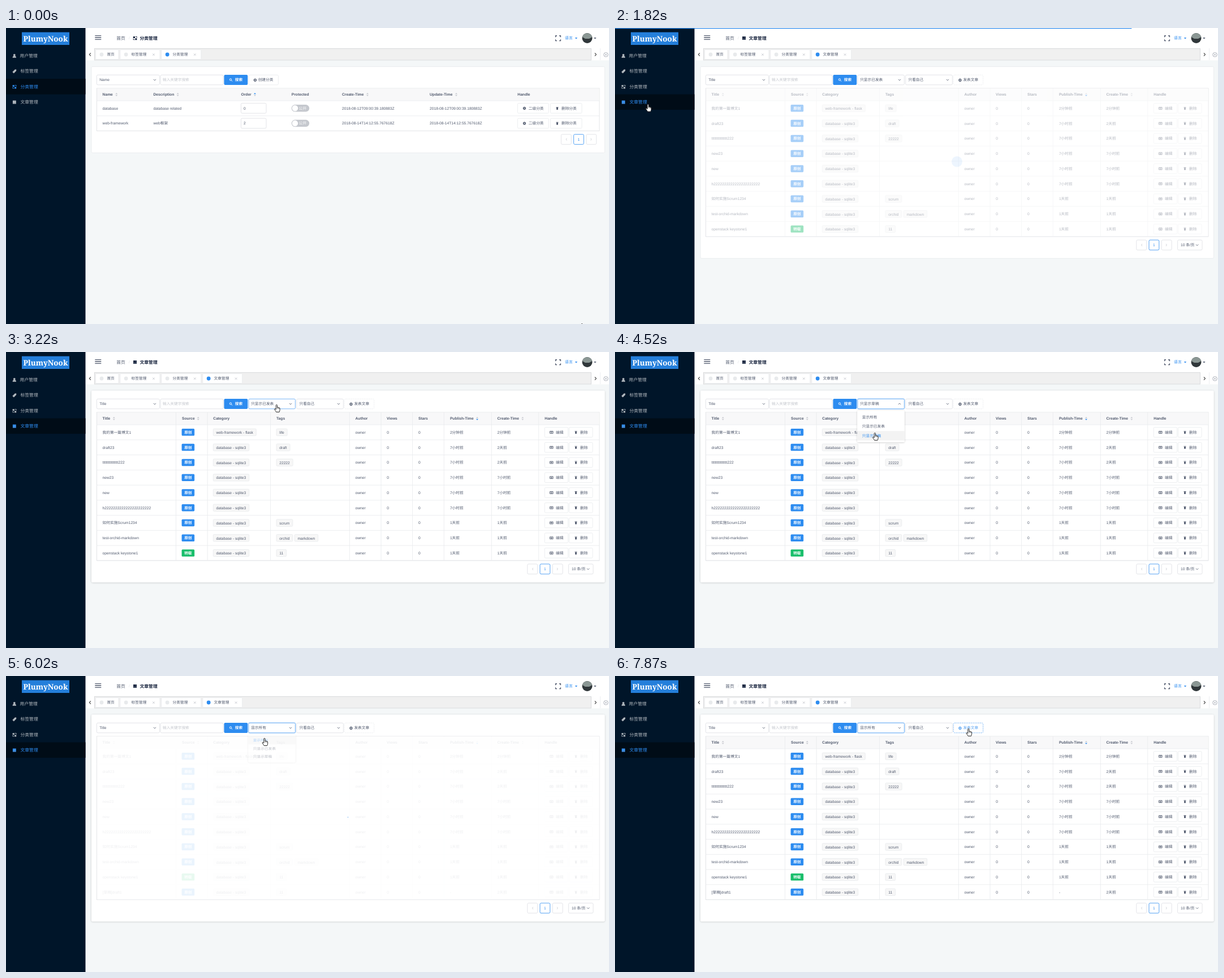
Recreate the animation shown at these times as an HTML page. Size 1066 by 525 pixels, loop 8000 ms.

```html
<!DOCTYPE html>
<html lang="zh-CN">
<head>
<meta charset="utf-8">
<title>文章管理</title>
<style>
  html, body { margin: 0; width: 100%; height: 100%; overflow: hidden; background: #f4f7f8; }
  svg { display: block; width: 1066px; height: 525px; }
  text {
    font-family: "Liberation Sans", "Noto Sans CJK SC", "Noto Sans CJK", sans-serif;
    text-rendering: geometricPrecision;
    white-space: pre;
  }
  #brand { font: bold 13.5px "Noto Serif", serif; }
</style>
</head>
<body>
<svg id="stage" viewBox="0 0 1066 525" xmlns="http://www.w3.org/2000/svg"></svg>
<script>
const LOOP = 8000, SIZE = 6.69, ROW = 26.77, HEAD = 129;
const BLUE = '#2d8cf0', INK = '#515a6e', LINE = '#dcdee2', PALE = '#e8eaec', MUTED = '#c5c8ce';

// ---- drawing helpers (cy is the vertical middle) ----
const text = (x, cy, s, fill = INK, size = SIZE, more = '') =>
  `<text x="${x}" y="${cy + size * 0.36}" font-size="${size}" fill="${fill}" ${more}>${s}</text>`;
const bold = (x, cy, s, fill = INK, size = SIZE) => text(x, cy, s, fill, size, 'font-weight="bold"');
const box = (x, y, x2, y2, fill = '#fff', stroke = 'none', rx = 0, more = '') =>
  `<rect x="${x}" y="${y}" width="${x2 - x}" height="${y2 - y}" rx="${rx}" fill="${fill}" stroke="${stroke}" stroke-width=".8" ${more}/>`;
const line = (d, stroke = INK, w = 0.8, more = '') =>
  `<path d="${d}" fill="none" stroke="${stroke}" stroke-width="${w}" ${more}/>`;
const shape = (d, fill = 'currentColor') => `<path d="${d}" fill="${fill}"/>`;
const dot = (x, y, r, fill) => `<circle cx="${x}" cy="${y}" r="${r}" fill="${fill}"/>`;
const group = (id, body, more = '') => `<g id="${id}" ${more}>${body}</g>`;
const at = (x, y, body) => `<g transform="translate(${x} ${y})">${body}</g>`;
const chevron = (x, y, dir = 1) => `M${x - 2.2} ${y - 1.1 * dir}L${x} ${y + 1.1 * dir}L${x + 2.2} ${y - 1.1 * dir}`;

const pen = document.createElement('canvas').getContext('2d');
pen.font = '100px "Liberation Sans", sans-serif';
const widthOf = s => pen.measureText(s).width * SIZE / 100;

const icons = {
  user: dot(0, -1.4, 1.9, 'currentColor') + shape('M-3.2 3.4Q-3.2 -.2 0 -.2T3.2 3.4Z'),
  tag: shape('M-3.5 1.2L1 -3.2L3.4 -3.2L3.4 -.8L-1 3.6Z'),
  sort: shape('M-3.2 -3H0V0H-3.2ZM.4 .3H3.4V3.2H.4Z') + line('M.8 -2.6H3.3V-.6M-2.9 .8V2.7H-.3', 'currentColor', 0.9),
  book: shape('M-2.9 -3H3V3H-2.9Z') + line('M-2 1.7H2.3M.8 -2.4V-.6', '#8b99a8', 0.7),
  plus: dot(0, 0, 2.6, 'currentColor') + line('M-1.5 0H1.5M0 -1.5V1.5', '#fff', 0.8),
  cross: dot(0, 0, 2.6, 'currentColor') + line('M-1 -1L1 1M1 -1L-1 1', '#fff', 0.8),
  trash: shape('M-2 -2.4H2V-1.6H-2ZM-1.6 -1.2H1.6L1.3 2.6H-1.3Z'),
  card: line('M-2.8 -1.9H2.8V1.9H-2.8ZM-1.6 -.5H1.6M-1 .8H1', 'currentColor', 0.9),
  search: `<circle cx="-.5" cy="-.5" r="1.7" fill="none" stroke="currentColor" stroke-width=".9"/>` + line('M.8 .8L2.6 2.6', 'currentColor', 1)
};
const icon = (name, x, y, color) => `<g transform="translate(${x} ${y})"${color ? ` style="color:${color}"` : ''}>${icons[name]}</g>`;

const button = (x, x2, cy, name, label, lx) =>
  box(x, cy - 8.8, x2, cy + 8.8, '#fff', PALE, 1.6) + icon(name, x + 12, cy, INK) + text(lx, cy, label);
const select = (x, x2, label) =>
  box(x, 83.3, x2, 100.8, '#fff', LINE, 2) + text(x + 4.8, 92, label) + line(chevron(x2 - 8.5, 92));
const sorter = (x, active = 0) =>
  shape(`M${x - 2} 117.3L${x} 115L${x + 2} 117.3Z`, active > 0 ? BLUE : MUTED) +
  shape(`M${x - 2} 118.8L${x} 121.1L${x + 2} 118.8Z`, active < 0 ? BLUE : MUTED);
const headings = list => list.map(([x, s]) => bold(x, 118, s)).join('');
const pager = (x, cy) => [0, 22.2, 44.5].map((dx, i) => {
  const mid = x + dx + 8.9;
  return box(x + dx, cy - 8.9, x + dx + 17.8, cy + 8.9, '#fff', i === 1 ? BLUE : LINE, 2) +
    (i === 1 ? text(mid - 1.9, cy, '1', BLUE)
      : line(`M${mid + 1 - i} ${cy - 2}l${i - 1} 2l${1 - i} 2`, MUTED));
}).join('');
const search = field => select(160.4, 271.4, field) +
  box(273.2, 83.3, 384, 100.8, '#fff', LINE, 2) + text(277, 92, '输入关键字搜索', MUTED) +
  box(385.5, 83, 427.3, 101, BLUE, 'none', 2) + icon('search', 397.5, 92, '#fff') + bold(404.8, 92, '搜索', '#fff');

// ---- shell ----
const menu = [['user', '用户管理'], ['tag', '标签管理'], ['sort', '分类管理'], ['book', '文章管理']];
const menuY = i => 49 + 27.4 * i;
const sidebar = box(0, 0, 140.5, 525, '#001529') + box(28, 7.5, 112, 30, '#247fdb') +
  `<text id="brand" x="70" y="23.6" text-anchor="middle" fill="#fff" textLength="">PlumyNook</text>` +
  `<rect id="active" width="140.5" height="27.5" fill="#000c17"/>` +
  menu.map(([name, s], i) => group('menu' + i,
    icon(name, 14.8, menuY(i) + 0.4) + text(i ? 25.5 : 24.6, menuY(i), s, 'currentColor', 7.8))).join('');

const crumb = (name, s) => icon(name, 228, 18, '#17233d') + bold(236.5, 17.8, s, '#17233d', 7.8);
const header = box(140.5, 0, 1066, 36, '#fff') +
  line('M157.3 13.6H168.3M157.3 17H168.3M157.3 20.4H168.3', INK, 1.3) +
  text(195.3, 17.8, '首页', INK, 7.8) + text(217, 18, '/', LINE) +
  group('crumbOld', crumb('sort', '分类管理')) + group('crumbNew', crumb('book', '文章管理')) +
  line('M974 13.8H971.6V16.2M978 13.8H980.4V16.2M974 22.6H971.6V20.2M978 22.6H980.4V20.2', INK, 1.4) +
  text(988, 18, '语言', BLUE, 6.9) + shape('M1005.8 17L1010.2 17L1008 19.4Z', BLUE) +
  dot(1027.5, 18, 9, '#30373a') + shape('M1018.8 16A9 9 0 0 1 1036.2 16L1031 19H1024Z', '#8b9794') +
  shape('M1039.2 17L1043.6 17L1041.4 19.4Z', INK);

const tab = (x, x2, s, dotId) => box(x, 38.5, x2, 55.6, '#fff', PALE, 1.2) +
  `<circle id="${dotId}" cx="${x + 10.4}" cy="47" r="3.4" fill="${PALE}"/>` + text(x + 19.8, 47, s) +
  (x2 - x > 50 ? line(`M${x2 - 12.8} 45.4l3.6 3.6m0 -3.6l-3.6 3.6`, '#a9aeb8', 0.6) : '');
const tabs = box(140.5, 36, 1066, 57.3, '#fff') + box(156.5, 36.5, 1034.5, 57, '#f0f0f0', '#d2d4d6') +
  line('M149.8 44.4L147.4 47L149.8 49.6M1041 44.4L1043.4 47L1041 49.6', '#333', 1.1) + line('M1050.5 36V57', PALE) +
  `<circle cx="1060.5" cy="47.3" r="3.8" fill="none" stroke="#8c939f" stroke-width=".7"/>` +
  line('M1058.9 45.7l3.2 3.2m0 -3.2l-3.2 3.2', '#8c939f', 0.7) +
  tab(158.6, 199, '首页', 'd0') + tab(201.8, 272, '标签管理', 'd1') + tab(274.8, 344.8, '分类管理', 'd2') +
  group('tabNew', tab(347.8, 417.6, '文章管理', 'd3'));

// ---- category page ----
const categoryRow = ([name, about, order, stamp], i) => {
  const cy = 142.3 + ROW * i;
  return text(170.6, cy, name) + text(260.5, cy, about) +
    box(415.5, cy - 8.9, 460, cy + 8.9, '#fff', LINE, 2) + text(420, cy, order) +
    box(504.7, cy - 6.2, 536.2, cy + 6.2, MUTED, 'none', 6.2) + dot(511, cy, 5.2, '#fff') + text(517.8, cy, '公开', '#fff') +
    text(594, cy, stamp) + text(749, cy, stamp) +
    button(904.5, 959.3, cy, 'cross', '二级分类', 923.8) + button(962.5, 1018, cy, 'trash', '删除分类', 982);
};
const category = search('Name') +
  box(429, 83.3, 481.4, 100.8, '#fff', PALE, 2) + icon('plus', 440.4, 92.3, INK) + text(445.7, 92, '创建分类') +
  box(160.5, 107, 1049, 182.5, '#fff', LINE) + box(160.9, 107.4, 1048.6, HEAD, '#f8f8f9') +
  line(`M160.5 ${HEAD}H1049M160.5 155.8H1049`, PALE) +
  headings([[170.6, 'Name'], [260.5, 'Description'], [415.5, 'Order'], [504.8, 'Protected'], [594, 'Create-Time'], [749, 'Update-Time'], [904.3, 'Handle']]) +
  sorter(195.3) + sorter(303.7) + sorter(440, 1) + sorter(639) + sorter(796) +
  [['database', 'database related', '0', '2018-08-12T09:00:39.180883Z'],
   ['web-framework', 'web框架', '2', '2018-08-14T14:12:55.767618Z']].map(categoryRow).join('') +
  pager(981.4, 197.5);

// ---- article page ----
const SQL = 'database - sqlite3';
const articles = [
  ['我的第一篇博文1', 'web-framework - flask', 'life', '2分钟前', '2分钟前'],
  ['draft23', SQL, 'draft', '7小时前', '2天前'],
  ['t'.repeat(15) + '222', SQL, '22222', '7小时前', '2天前'],
  ['new23', SQL, '', '7小时前', '7小时前'],
  ['new', SQL, '', '7小时前', '7小时前'],
  ['h' + '2'.repeat(22), SQL, '', '7小时前', '7小时前'],
  ['如何实施Scrum1234', SQL, 'scrum', '1天前', '1天前'],
  ['test-orchid-markdown', SQL, 'orchid markdown', '1天前', '1天前'],
  ['openstack keystone1', SQL, '11', '1天前', '1天前'],
  ['[草稿]draft1', SQL, '11', '-', '2天前']
];
const chip = (x, s) => box(x, -6.2, x + widthOf(s) + 10.6, 6.2, '#f7f7f7', PALE, 1.5) + text(x + 5.2, 0.3, s);
const chips = (x, words) => words.split(' ').filter(Boolean).map(s => {
  const out = chip(x, s);
  x += widthOf(s) + 14;
  return out;
}).join('');
const articleRow = ([title, kind, tags, published, created], i) => {
  const copied = i === 8;
  return group('row' + i, line(`M160.5 13.4H1049`, PALE) + text(170.6, 0, title) +
    box(310.6, -6.3, 333.2, 6.2, copied ? '#19be6b' : BLUE, 'none', 1.6) + bold(315.2, 0, copied ? '转载' : '原创', '#fff') +
    chip(366.3, kind) + chips(478, tags) + text(617.5, 0, 'owner') + text(673.3, 0, '0') + text(729, 0, '0') +
    text(784.9, 0, published) + text(868.5, 0, created) +
    button(952.3, 993.6, 0, 'card', '编辑', 972) + button(995.5, 1037, 0, 'trash', '删除', 1015));
};
const columns = [300.5, 356.2, 467.6, 607.3, 663, 718.6, 774.3, 858.3, 941.7];
const options = ['显示所有', '只显示已发表', '只显示草稿'];
const article = search('Title') +
  box(428.9, 83.3, 511.4, 100.8, 'none', 'rgba(45,140,240,.22)', 2, 'id="glow" style="stroke-width:2.4"') +
  box(428.9, 83.3, 511.4, 100.8, '#fff', LINE, 2, 'id="selBox"') + text(433.2, 92, '', INK, SIZE, 'id="selText"') +
  line('', INK, 0.8, 'id="selMark"') + select(513.7, 596.4, '只看自己') +
  group('publish', box(598.4, 83.3, 650.7, 100.8, '#fff', PALE, 2, 'id="pubBox" stroke-dasharray="2 1.2"') +
    icon('plus', 610, 92.4) + text(615.4, 92, '发表文章', 'currentColor')) +
  box(160.5, 107, 1049, 182, '#fff', LINE, 0, 'id="frame"') + box(160.9, 107.4, 1048.6, HEAD, '#f8f8f9') +
  line(`M160.5 ${HEAD}H1049`, PALE) +
  headings([[170.6, 'Title'], [311, 'Source'], [366.3, 'Category'], [478, 'Tags'], [617.5, 'Author'], [673, 'Views'], [729, 'Stars'], [784.9, 'Publish-Time'], [868.5, 'Create-Time'], [952.3, 'Handle']]) +
  sorter(190.8) + sorter(339.8) + sorter(833, -1) + sorter(913.3) +
  text(605, 142.4, '暂无数据', INK, SIZE, 'id="none" text-anchor="middle"') +
  articles.map(articleRow).join('') + line('', PALE, 0.8, 'id="rules"') +
  group('veil', box(160.9, 107.4, 1048.6, 200, '#fff', 'none', 0, 'id="sheet" fill-opacity=".9"') +
    `<circle id="spin" cx="604.5" fill="${BLUE}"/>`) +
  group('foot', pager(921.8, 0) + box(994.6, -8.9, 1038, 8.9, '#fff', LINE, 2) + text(1000, 0, '10 条/页') + line(chevron(1029.2, 0))) +
  group('drop', box(428.3, 104, 511.8, 160, '#fff', 'none', 2, 'filter="url(#soft)"') +
    `<rect id="over" x="428.3" width="83.5" height="16.8" fill="#f3f3f3"/>` +
    options.map((s, i) => text(436.8, 115.3 + 16.7 * i, s, INK, SIZE, `id="opt${i}"`)).join(''));

const pointers =
  group('arrow', `<path d="M0 0V9L2.1 7.2L3.5 10.3L4.9 9.7L3.5 6.7L6.2 6.4Z" fill="#fff" stroke="#111" stroke-width=".8"/>`) +
  group('hand', `<path d="M-1.2 1Q-1.2 0 -.1 0T1 1V4.6Q2 4 2.6 4.9Q3.6 4.4 4.2 5.4Q5.6 5.2 5.6 6.8V9.2Q5.6 11 4.6 13H-.8Q-1.6 11.4 -3.7 8.6Q-4.2 7.2 -2.9 7.1L-1.2 8.4Z" fill="#fff" stroke="#111" stroke-width=".9" stroke-linejoin="round"/>` +
    line('M1 4.6V7M2.6 5V7.2M4.2 5.5V7.3', '#111', 0.6));

document.getElementById('stage').innerHTML = `<defs><filter id="soft" x="-20%" y="-20%" width="140%" height="140%">
  <feDropShadow dx="0" dy=".6" stdDeviation="1.4" flood-color="#000" flood-opacity=".22"/></filter></defs>` +
  box(151, 68.5, 1058.5, 221.4, '#fff', PALE, 2, 'id="card"') + group('category', category) + group('article', article) +
  header + tabs + sidebar + `<rect id="bar" height="1.2" fill="${BLUE}"/>` + pointers;

// ---- motion ----
const ui = {};
document.querySelectorAll('#stage [id]').forEach(el => ui[el.id] = el);
const set = (id, attrs) => { for (const k in attrs) ui[id].setAttribute(k, attrs[k]); };
const show = (id, on) => { ui[id].style.display = on ? '' : 'none'; };
const ramp = (t, a, b) => Math.min(1, Math.max(0, (t - a) / (b - a)));
const pulse = (t, a, b, inT, outT) => Math.min(ramp(t, a, a + inT), 1 - ramp(t, b, b + outT));

const route = [
  [0, 1018, 524], [70, 1018, 524], [560, 60, 67], [820, 40.5, 138], [1750, 40.5, 138], [2300, 433, 77],
  [2530, 436, 79], [2950, 476, 100], [3220, 478.5, 93.5], [3600, 478.5, 93.5], [4220, 459.5, 143.5], [4700, 459.5, 143.5],
  [5050, 462, 95], [5300, 459, 95], [5530, 457, 106], [5700, 457, 110.5], [6860, 457, 110.5], [7320, 623, 101],
  [7490, 624, 99], [7720, 625, 95], [7870, 625, 93.5], [8000, 625, 93.5]
];
function pointerAt(t) {
  const i = Math.max(1, route.findIndex(p => p[0] > t));
  const [a, b] = [route[i - 1], route[i]];
  const p = ramp(t, a[0], b[0]), e = p * p * (3 - 2 * p);
  return [a[1] + (b[1] - a[1]) * e, a[2] + (b[2] - a[2]) * e];
}

function rowsAt(t) {
  if (t < 1750) return [];
  if (t < 4780) return [0, 1, 2, 3, 4, 5, 6, 7, 8];
  return t < 6000 ? [9] : articles.map((_, i) => i);
}

function drawTable(t) {
  const rows = rowsAt(t), bottom = HEAD + ROW * Math.max(1, rows.length);
  articles.forEach((_, i) => {
    const k = rows.indexOf(i);
    show('row' + i, k >= 0);
    if (k >= 0) set('row' + i, { transform: `translate(0 ${142.4 + ROW * k})` });
  });
  show('none', !rows.length);
  set('frame', { height: bottom - 107 });
  set('rules', { d: columns.map(x => `M${x} 107V${rows.length ? bottom : HEAD}`).join('') });
  set('foot', { transform: `translate(0 ${bottom + 15})` });

  const veil = Math.max(pulse(t, 1300, 1750, 100, 200), pulse(t, 4590, 4800, 90, 200), pulse(t, 5900, 6080, 90, 220));
  const beat = ((t - 5960) % 1000 + 1000) % 1000 / 1000;
  set('veil', { opacity: veil });
  set('sheet', { height: bottom - 107.8 });
  set('spin', { cy: (bottom + 107) / 2 - 1.5, r: 11 * beat, opacity: 1 - beat });
  return bottom;
}

function drawFilter(t, y) {
  const choice = t < 4480 ? 1 : t < 5820 ? 2 : 0;
  const opened = (t >= 3450 && t < 4590) || (t >= 5150 && t < 5930);
  const p = Math.max(pulse(t, 3450, 4590, 150, 150), pulse(t, 5150, 5930, 150, 150));
  ui.selText.textContent = options[choice];
  set('selBox', { stroke: t >= 2900 ? '#57a3f3' : LINE });
  set('selMark', { d: chevron(503, 92, opened ? -1 : 1) });
  show('glow', t >= 3450);
  show('drop', p > 0);
  const squash = 0.8 + 0.2 * p;
  set('drop', { opacity: p, transform: `translate(0 ${104 * (1 - squash)}) scale(1 ${squash})` });
  const hover = Math.floor((y + 2 - 106.8) / 16.7);
  show('over', hover >= 0 && hover < 3);
  set('over', { y: 106.8 + 16.7 * hover });
  options.forEach((_, i) => set('opt' + i, { fill: i === choice ? BLUE : INK }));
}

function render(t) {
  const [x, y] = pointerAt(t);
  const fresh = t >= 1250, current = t < 950 ? 2 : 3;

  set('active', { y: 35.2 + 27.45 * current });
  menu.forEach((_, i) => {
    const hover = x < 140 && Math.floor((y - 35.2) / 27.45) === i;
    ui['menu' + i].style.color = i === current ? BLUE : hover ? '#fff' : '#b3b9bf';
  });

  show('category', !fresh);
  show('crumbOld', !fresh);
  ['article', 'crumbNew', 'tabNew'].forEach(id => show(id, fresh));
  set('d2', { fill: fresh ? PALE : BLUE });
  set('d3', { fill: BLUE });

  const bottom = drawTable(t);
  drawFilter(t, y);
  const lifted = t >= 2400;
  set('card', {
    height: (t < 1750 ? 221.4 : bottom + 38.6) - 68.5,
    filter: lifted ? 'url(#soft)' : 'none', stroke: lifted ? 'none' : PALE
  });

  const onButton = t >= 7490;
  ui.publish.style.color = onButton ? '#57a3f3' : INK;
  set('pubBox', { stroke: onButton ? '#57a3f3' : PALE });

  set('bar', {
    width: 1066 * (0.8 * ramp(t, 900, 1700) + 0.2 * ramp(t, 1750, 2000)),
    opacity: 1 - ramp(t, 2600, 2800)
  });

  const hand = (t >= 540 && t < 1900) || (t >= 2850 && t < 6250) || onButton;
  show('hand', hand);
  show('arrow', !hand);
  set(hand ? 'hand' : 'arrow', { transform: `translate(${x} ${y})` });
}

const start = performance.now();
function tick() {
  render((performance.now() - start) % LOOP);
  requestAnimationFrame(tick);
}
tick();
</script>
</body>
</html>
```
